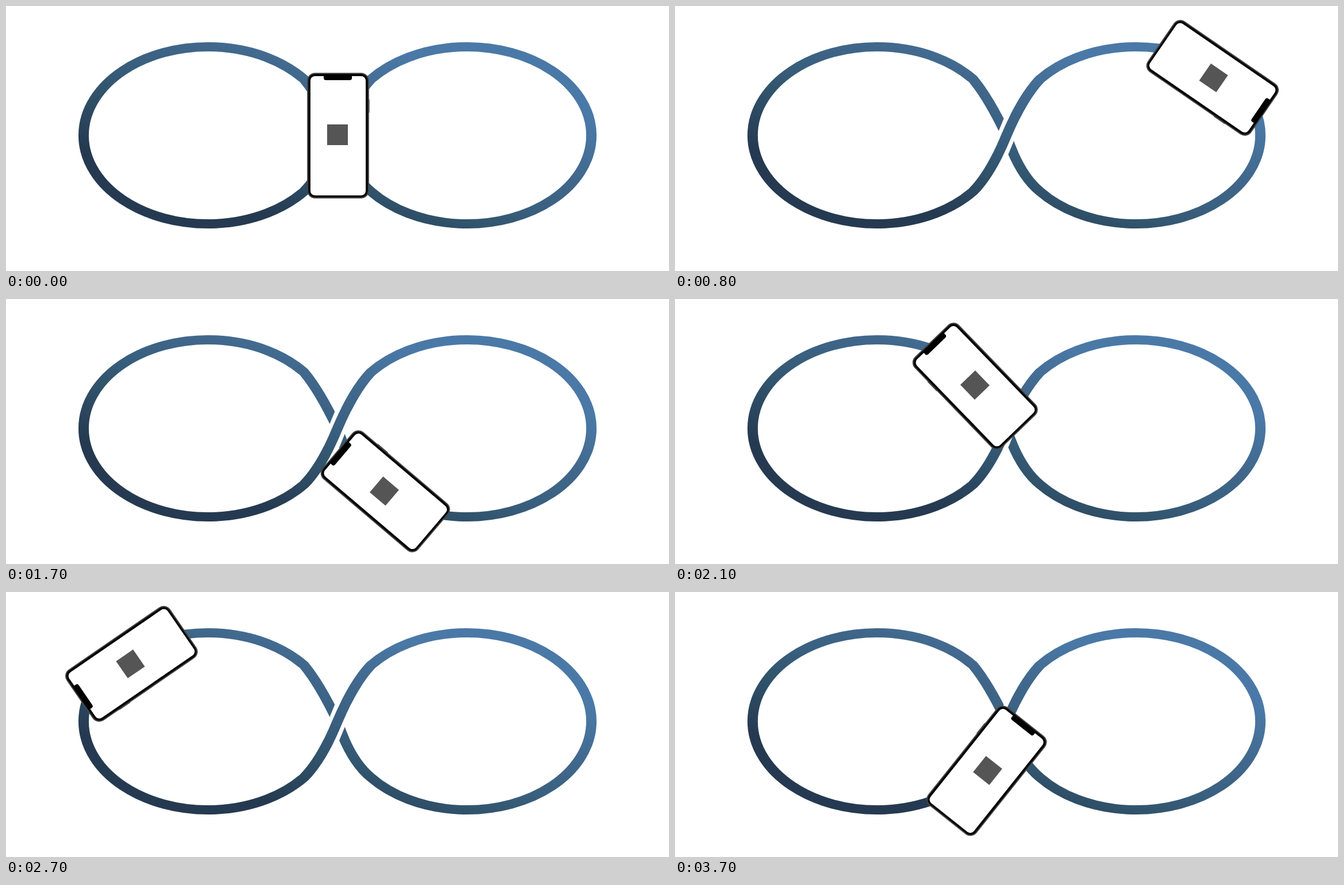
These frames come from a looping animation (1152x461 px, 3.8 s). An HTML page:

```html
<!DOCTYPE html>
<html lang="en">
<head>
<meta charset="utf-8">
<title>Phone on an infinity loop</title>
<style>
  html, body { margin: 0; height: 100%; overflow: hidden; background: #fff; }
  svg { display: block; width: 100%; height: 100%; }
</style>
</head>
<body>
<svg viewBox="0 0 1152 461">
  <defs>
    <linearGradient id="blue" gradientUnits="userSpaceOnUse" x1="-113" y1="278" x2="113" y2="-278">
      <stop offset=".22" stop-color="#253a51"/>
      <stop offset=".4" stop-color="#32556e"/>
      <stop offset=".5" stop-color="#3a6080"/>
      <stop offset=".62" stop-color="#41688c"/>
      <stop offset=".78" stop-color="#4a79a7"/>
    </linearGradient>
  </defs>

  <g transform="translate(576 225) scale(1.125 1)" fill="none" stroke="url(#blue)" stroke-width="16">
    <path d="M-51.6 97.6Q-24 66 0 0Q25 -66 51.6 -97.6A192 154 0 1 1 51.6 97.6
             Q19.5 68 0 0Q-27.5 -65 -51.6 -97.6A192 154 0 1 0 -51.6 97.6Z"/>
    <path d="M-12.5 34L12.5 -34" stroke="#fff" stroke-width="28"/>
    <path d="M-51.6 97.6Q-24 66 0 0Q25 -66 51.6 -97.6"/>
  </g>

  <g id="phone">
    <path d="M53.8 -63V-40" stroke="#333" stroke-width="1.4"/>
    <rect x="-53.8" y="-109.3" width="107.6" height="218.6" rx="14" fill="#444"/>
    <rect x="-51.8" y="-107.3" width="103.6" height="214.6" rx="12"/>
    <rect x="-48" y="-103.5" width="96" height="207.5" rx="8" fill="#fff"/>
    <path d="M-25 -104H24V-100Q24 -96.5 20 -96.5H-21Q-25 -96.5 -25 -100Z"/>
    <rect x="-19" y="-19.5" width="36" height="36" fill="#555"/>
  </g>
</svg>
<script>
const STEP = 100, LOBE_STEPS = 19, REST = 32;
// Key poses round the right lobe, two steps apart: x, y, degrees
const keys = [
  [577, 225.5, 0], [630.5, 151.5, 44], [706, 109, 71], [827.5, 91, 99], [934, 125, 124.5],
  [1010, 225, 182], [933, 325.5, 240], [845, 368, 270], [723, 359, 296], [610.5, 311, 321.5]
];
const key = i => keys[Math.max(0, Math.min(keys.length - 1, i))];
const phone = document.getElementById("phone");

// Catmull-Rom spline through the key poses
function poseAt(u) {
  const i = Math.floor(u), f = u - i;
  const [a, b, c, d] = [i - 1, i, i + 1, i + 2].map(key);
  return b.map((p, k) => p + f / 2 * (c[k] - a[k]
    + f * (2 * a[k] - 5 * p + 4 * c[k] - d[k] + f * (3 * (p - c[k]) + d[k] - a[k]))));
}

function draw(time) {
  let step = Math.floor(time / STEP) % (2 * LOBE_STEPS);
  if (step === REST) step--; // the phone pauses once on the left
  const [x, y, angle] = poseAt(step % LOBE_STEPS / 2);
  // The left lobe mirrors the right one
  const mirror = step < LOBE_STEPS ? "" : "translate(1152 0) scale(-1 1) ";
  phone.setAttribute("transform", `${mirror}translate(${x} ${y}) rotate(${angle})`);
}

let start;
function tick(now) {
  start ??= now;
  draw(now - start);
  requestAnimationFrame(tick);
}
draw(0);
requestAnimationFrame(tick);
</script>
</body>
</html>
```
